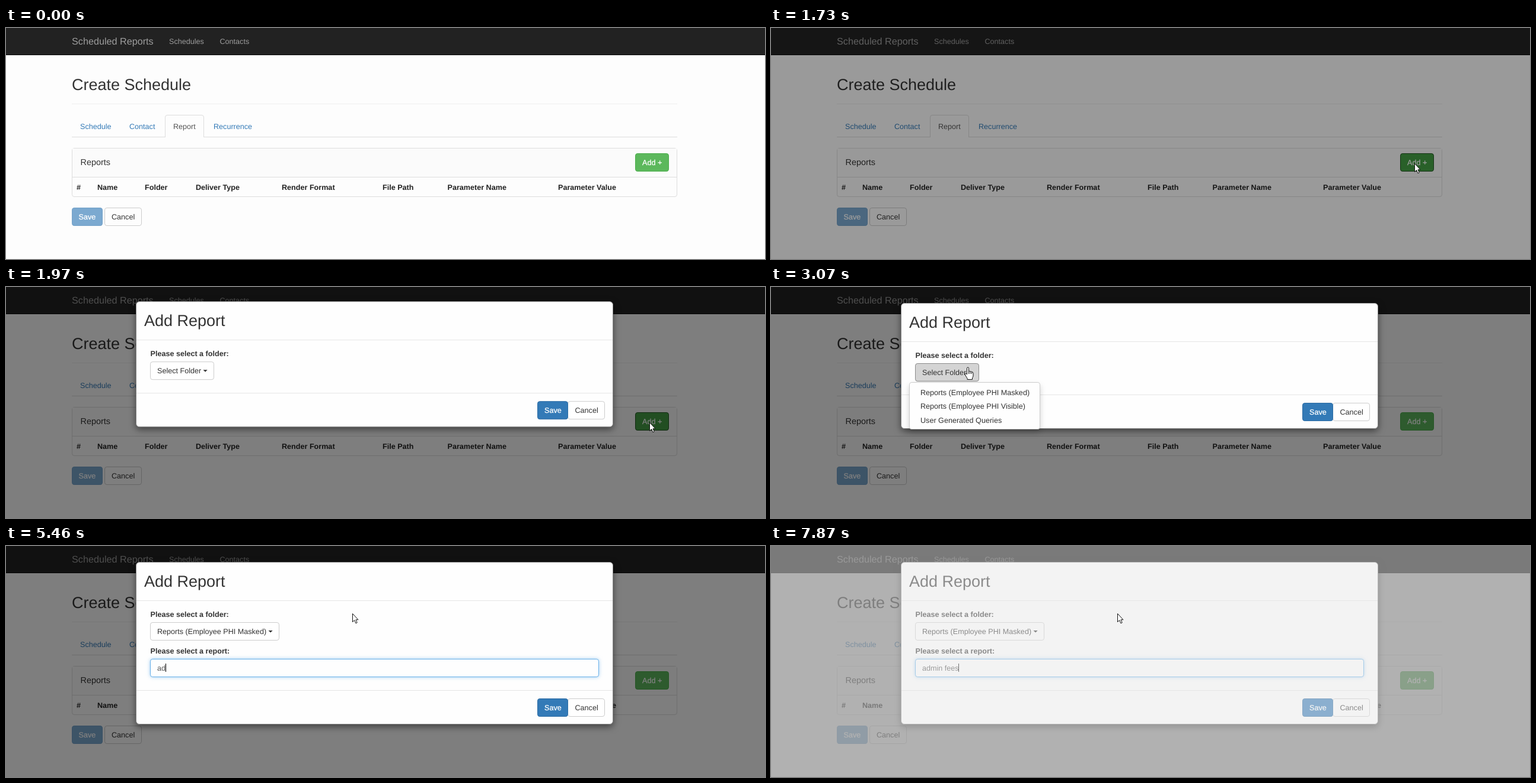
These frames come from a looping animation (1280 by 391 pixels, 8000 ms). An HTML page:

```html
<!DOCTYPE html>
<html lang="en">
<head>
<meta charset="utf-8">
<title>Create Schedule</title>
<style>
html, body { margin: 0; width: 100%; height: 100%; overflow: hidden; background: #fdfdfd; }
svg { display: block; width: 100vw; height: 100vh; }
text {
  font: 12.6px "Liberation Sans", Arial, sans-serif;
  fill: #333; white-space: pre; text-rendering: geometricPrecision;
}
.bold { font-weight: bold; }
.dark { fill: #222; }
.h { font-size: 27px; }
.title { font-size: 14.4px; }
.brand { font-size: 16.2px; }
.nav { fill: #9d9d9d; }
.link { fill: #337ab7; }
.tab { fill: #555; }
.light { fill: #fff; stroke: #fff; stroke-width: .3; }
.modal { filter: drop-shadow(0 4px 6px rgba(0, 0, 0, .5)); }
.menu { filter: drop-shadow(0 5px 5px rgba(0, 0, 0, .18)); }
.glow { filter: drop-shadow(0 0 3px rgba(102, 175, 233, .6)); }
</style>
</head>
<body>
<svg id="stage" viewBox="0 0 1280 391"></svg>
<script>
const LOOP = 8000;
const stage = document.getElementById('stage');

const text = (x, y, s, cls = '', id = '') => `<text x="${x}" y="${y}" class="${cls}" id="${id}">${s}</text>`;
const rect = (x, y, w, h, fill, extra = '') =>
  `<rect x="${x}" y="${y}" width="${w}" height="${h}" fill="${fill}" ${extra}/>`;
const box = (x, y, w, h, fill, stroke, id = '', r = 3.6) =>
  rect(x + .5, y + .5, w - 1, h - 1, fill, `stroke="${stroke}" rx="${r}" id="${id}"`);

const headings = [
  [119, '#'], [154, 'Name'], [234, 'Folder'], [320, 'Deliver Type'], [465, 'Render Format'],
  [635, 'File Path'], [744.5, 'Parameter Name'], [931, 'Parameter Value']
];

const page = `
  ${rect(0, 0, 1280, 391, '#fdfdfd')}
  ${rect(0, 0, 1280, 45, '#222')}${rect(0, 45, 1280, 1, '#080808')}
  ${text(111, 28, 'Scheduled Reports', 'brand nav')}
  ${text(275, 27, 'Schedules', 'nav')}${text(360.5, 27, 'Contacts', 'nav')}
  ${text(111, 105, 'Create Schedule', 'h')}
  ${rect(111, 128, 1021, 1, '#eee')}
  ${rect(111, 184, 157, 1, '#ddd')}${rect(333, 184, 799, 1, '#ddd')}
  <path d="M268.5 185V151Q268.5 147.500 272 147.500H330Q333.500 147.500 333.500 151V185" fill="none" stroke="#ddd"/>
  ${text(125, 171, 'Schedule', 'link')}${text(208, 171, 'Contact', 'link')}
  ${text(282, 171, 'Report', 'tab')}${text(350, 171, 'Recurrence', 'link')}
  ${box(111, 203, 1021, 83, '#fdfdfd', '#ddd')}
  ${rect(112, 204, 1019, 48, '#fbfbfb')}${rect(112, 252, 1019, 1, '#ddd')}
  ${text(125.5, 232, 'Reports', 'title')}
  ${box(1061, 212, 57, 31, '#5cb85c', '#4cae4c', 'add')}${text(1073, 232, 'Add +', 'light')}
  ${headings.map(([x, s]) => text(x, 273.5, s, 'bold dark')).join('')}
  ${box(111, 304, 52, 31, '#7ba9d0', '#74a2c9')}${text(122.5, 324, 'Save', 'light')}
  ${box(166, 304, 63, 31, '#fdfdfd', '#ccc')}${text(178, 324, 'Cancel')}`;

const modal = `
  <g id="modal">
    <g class="modal">${box(219, 27, 805, 213, '#fefefe', '#8a8a8a', 'frame', 5.4)}</g>
    ${text(233, 69, 'Add Report', 'h')}
    ${rect(220, 92, 803, 1, '#e5e5e5')}
    ${text(243.5, 120, 'Please select a folder:', 'bold')}
    ${box(243, 129, 108, 31, '#fff', '#ccc', 'select')}
    ${text(255, 149, '', '', 'folder')}
    <path id="arrow" d="M0 0h7.200l-3.600 3.600z" fill="#333"/>
    <g id="field">
      ${text(243.5, 182, 'Please select a report:', 'bold')}
      <g id="glow">${box(243, 191, 757, 31, '#fefefe', '#ccc', 'input')}</g>
      ${text(255, 211, '', 'tab', 'typed')}
      ${rect(255, 199, 1, 14, '#000', 'id="caret"')}
    </g>
    <g id="footer">
      ${rect(220, 182, 803, 1, '#e5e5e5')}
      ${box(947, 196, 63, 31, '#fff', '#ccc')}${text(959.5, 216, 'Cancel')}
      ${box(896, 196, 52, 31, '#337ab7', '#2e6da4')}${text(908, 216, 'Save', 'light')}
    </g>
    <g id="menu">
      <g class="menu">${box(233, 161, 221, 80, '#fefefe', '#ccc')}</g>
      ${text(252, 183, 'Reports (Employee PHI Masked)')}
      ${text(252, 206, 'Reports (Employee PHI Visible)')}
      ${text(252, 229.5, 'User Generated Queries')}
    </g>
  </g>`;

const cursor = `
  <g id="cursor" stroke="#111" fill="#fff" stroke-linejoin="round">
    <path id="pointer" d="M.5 .5V14.500L3.700 11.600L5.900 16.800L8.200 15.800L6 10.800H10z"/>
    <path id="hand" d="M-1.500 12V1.500Q-1.500 0 0 0T1.500 1.500V7Q2.500 5.800 4 7.200Q5.500 6.300 6.500 8Q8.800 7.600 9 9.500V14
      Q8.600 17 7.500 18V20.500H-1V18.500Q-2.500 17-5 11.500Q-5.200 9.700-3.500 10zM1.500 7V11M4 7.500V11M6.500 8.500V11"/>
  </g>`;

stage.innerHTML = page + rect(0, 0, 1280, 391, '#000', 'id="dim"') + modal +
  rect(0, 0, 1280, 391, '#e6e6e6', 'id="wash"') + cursor;

const el = {};
stage.querySelectorAll('[id]').forEach(n => { if (n.id) el[n.id] = n; });
const set = (id, attrs) => { for (const k in attrs) el[id].setAttribute(k, attrs[k]); };
const show = (id, on) => set(id, { visibility: on ? 'inherit' : 'hidden' });

const ramp = (t, a, b) => Math.min(1, Math.max(0, (t - a) / (b - a)));
const mix = (a, b, p) => a + (b - a) * p;
const out = n => p => 1 - (1 - p) ** n;
const inOut = p => p * p * (3 - 2 * p);

// start, end, destination, easing
const moves = [
  [420, 940, 1085, 229, out(2)],
  [2150, 2750, 332, 136, out(3)],
  [3200, 3600, 325, 174, inOut],
  [4120, 4500, 584, 114, inOut]
];

function cursorAt(t) {
  let x = 914, y = 391;
  for (const [a, b, dx, dy, ease] of moves) {
    const p = ease(ramp(t, a, b));
    x = mix(x, dx, p);
    y = mix(y, dy, p);
  }
  return [Math.round(x), Math.round(y)];
}

const phrase = 'admin fees';
const keys = [5310, 5460, 5760, 6070, 6110, 6250, 6400, 6490, 6670, 6820];
const inside = (x, y, l, t, r, b) => x >= l && x < r && y >= t && y < b;

function render(t) {
  const [x, y] = cursorAt(t);
  const picked = t >= 3910, open = t >= 2930 && !picked, clicked = t >= 1600;
  const selectRight = picked ? 461 : 351;
  const overAdd = t < 2150 && inside(x, y, 1061, 212, 1118, 243);
  const overSelect = t > 2000 && inside(x, y, 243, 129, selectRight, 160);

  show('cursor', t >= 430);
  set('cursor', { transform: `translate(${x} ${y})` });
  const hand = overSelect || open || (overAdd && !clicked);
  show('hand', hand && t >= 430);
  show('pointer', !hand && t >= 430);

  set('add', {
    fill: overAdd ? '#449d44' : '#5cb85c',
    stroke: overAdd ? (clicked ? '#255625' : '#398439') : '#4cae4c'
  });
  set('dim', { opacity: .5 * ramp(t, 1613, 1763) });

  const slide = -53 * (1 - out(2)(ramp(t, 1740, 2040)));
  set('modal', { opacity: ramp(t, 1740, 1890), transform: `translate(0 ${slide})` });
  show('modal', t > 1740);
  set('frame', { height: picked ? 274 : 212 });
  set('footer', { transform: `translate(0 ${picked ? 62 : 0})` });

  const pressed = open && t < 3770;
  set('select', {
    width: selectRight - 244,
    fill: pressed ? '#d4d4d4' : overSelect ? '#e6e6e6' : '#fff',
    stroke: pressed ? '#8c8c8c' : overSelect ? '#adadad' : '#ccc'
  });
  el.folder.textContent = picked ? 'Reports (Employee PHI Masked)' : 'Select Folder';
  set('arrow', { transform: `translate(${picked ? 442.5 : 332.5} 143)` });
  show('menu', open);
  show('field', picked);

  const focus = ramp(t, 3940, 4020);
  set('input', { stroke: `rgb(${mix(204, 102, focus)},${mix(204, 175, focus)},${mix(204, 233, focus)})` });
  set('glow', { class: focus === 1 ? 'glow' : '' });

  const count = keys.filter(k => t >= k).length;
  el.typed.textContent = phrase.slice(0, count);
  const width = count ? el.typed.getComputedTextLength() : 0;
  const since = t - (count ? keys[count - 1] : 3840);
  set('caret', { x: Math.floor(255 + width) });
  show('caret', picked && Math.floor(since / 525) % 2 === 0);

  set('wash', { opacity: .49 * ramp(t, 5730, 5820) });
}

const start = performance.now();
function tick() {
  render((performance.now() - start) % LOOP);
  requestAnimationFrame(tick);
}
tick();
</script>
</body>
</html>
```
